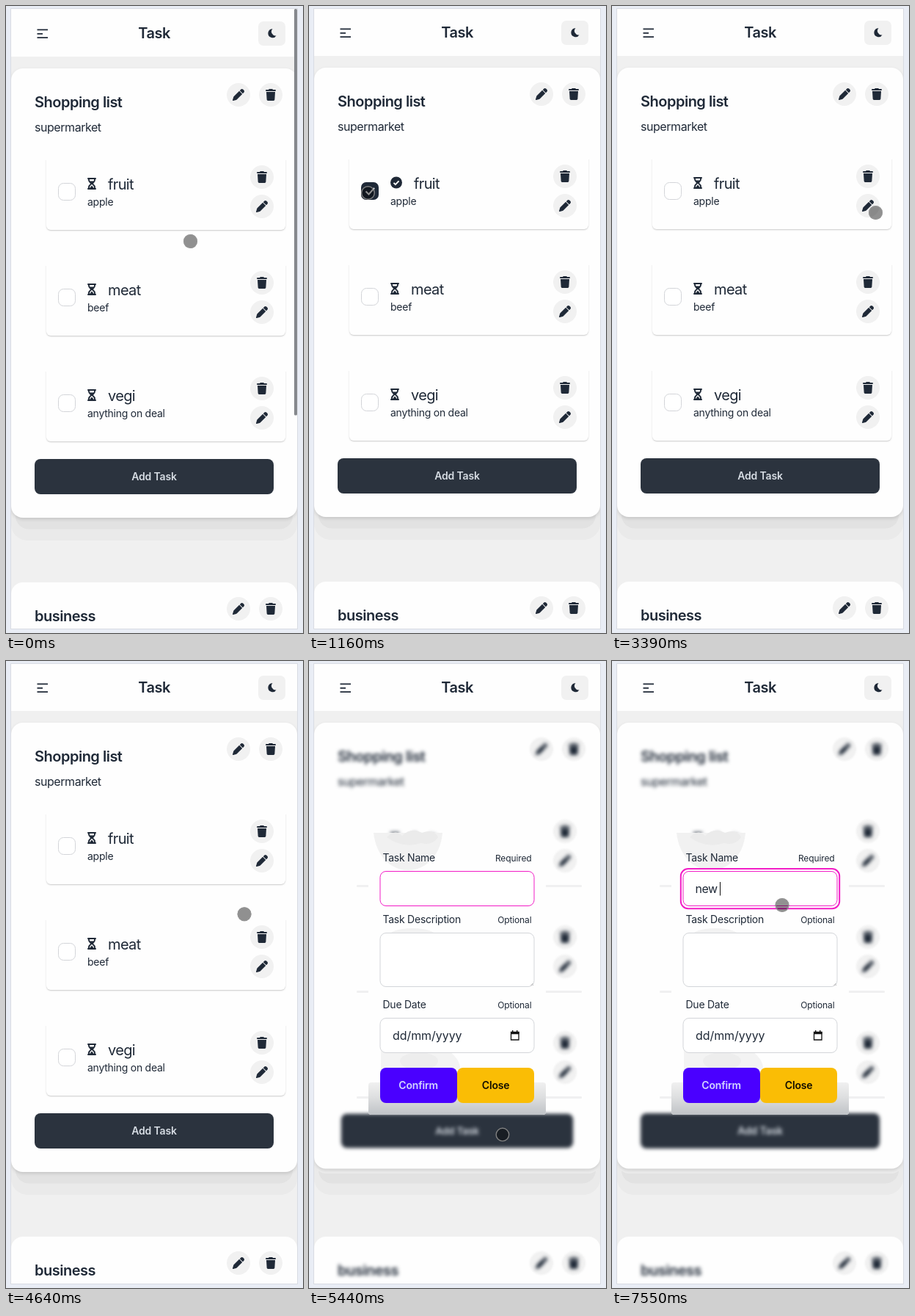
Recreate the animation shown at these times as an HTML page. Size 405 px wide and 854 px high, loop 8 s.

```html
<!DOCTYPE html>
<html lang="en">
<head>
<meta charset="utf-8">
<title>Task</title>
<style>
html, body { margin: 0; width: 100%; height: 100%; overflow: hidden; background: #e9edf5; }
svg { display: block; width: 405px; height: 854px; }
text { font-family: Inter, "Open Sans", sans-serif; font-optical-sizing: none; fill: #1f2937; white-space: pre; }
.h { font-size: 20px; font-weight: 600; letter-spacing: -.025em; }
.t { font-size: 20px; letter-spacing: -.032em; }
.m { font-size: 16px; letter-spacing: -.028em; }
.d { font-size: 16px; letter-spacing: -.004em; }
.s { font-size: 14px; letter-spacing: -.018em; }
.xs { font-size: 12px; letter-spacing: -.01em; }
.b { font-size: 14px; font-weight: 600; letter-spacing: -.012em; }
.end { text-anchor: end; }
.mid { text-anchor: middle; }
.ink { fill: #1f2937; }
.field { fill: #fff; stroke: #d3d5d9; }
.card { filter: drop-shadow(0 2px 2px rgba(0,0,0,.13)); }
.edge { fill: #fefefe; filter: drop-shadow(0 1px 1px rgba(0,0,0,.13)) drop-shadow(0 1px .6px rgba(0,0,0,.08)); }
.line { display: none; }
.open .line { display: inline; }
.open .edge, .open .box { display: none; }
.open .soft { filter: blur(2.5px); }
.open .disc { filter: blur(.8px); }
</style>
</head>
<body>
<svg id="stage" viewBox="0 0 405 854"></svg>
<script>
const stage = document.getElementById('stage');

const text = (x, y, cls, str, attrs = '') => `<text x="${x}" y="${y}" class="${cls}" ${attrs}>${str}</text>`;
const rect = (x, y, w, h, r, attrs) => `<rect x="${x}" y="${y}" width="${w}" height="${h}" rx="${r}" ${attrs}/>`;
const use = (id, x, y) => `<use href="#${id}" x="${x}" y="${y}"/>`;

const roundButton = (icon, x, y) =>
  `<circle class="disc" cx="${x}" cy="${y}" r="16" fill="#f1f1f1"/><g class="soft">${use(icon, x, y)}</g>`;

const cardHead = (title, y) =>
  text(39, y + 53, 'h soft', title) + roundButton('pen', 317, y + 36) + roundButton('trash', 361, y + 36);

const item = (title, note, i) => `<g transform="translate(0 ${i * 144})">
  <g clip-path="url(#itemClip)">${rect(55, 196, 326, 108, 6, 'class="edge"')}</g>
  ${rect(65, 305, 307, 3, 1, 'class="line" fill="#f0f0f1"')}
  ${rect(71.5, 240.5, 23, 23, 7, 'class="box" fill="#fff" stroke="#d3d5d9"')}
  <g class="soft">
    <g id="wait${i}">${use('glass', 111, 233)}</g>
    ${text(139, 249, 't', title, `id="title${i}"`)}
    ${text(111, 271, 's', note)}
  </g>
  ${roundButton('trash', 349, 232)}${roundButton('pen', 349, 272)}
</g>`;

const label = (y, name, hint) => text(100.5, y + 5, 's', name) + text(303.5, y + 4.5, 'xs end', hint);

stage.innerHTML = `
<defs>
  <clipPath id="screen"><rect x="7" y="4" width="390" height="844"/></clipPath>
  <clipPath id="itemClip"><rect x="48" y="209" width="340" height="104"/></clipPath>
  <linearGradient id="shade" x2="0" y2="1">
    <stop stop-color="#f0f0f0"/><stop offset=".45" stop-color="#dedfe0"/><stop offset="1" stop-color="#bfc2c6"/>
  </linearGradient>
  <g id="pen"><path class="ink" transform="translate(-8 -8) scale(.03125)"
    d="M363 19L314 68 444 198l49-49c25-25 25-65 0-90L453 19c-25-25-65-25-90 0zM292 90L59 323c-11 11-18 24-22 38L1 481c-6 20 10 36 30 30l120-35c14-4 27-12 38-23L422 220z"/></g>
  <g id="trash"><path class="ink" transform="translate(-7 -8) scale(.03125)"
    d="M135 18L128 32H32a32 32 0 0 0 0 64H416a32 32 0 0 0 0-64H320l-7-14C307 7 296 0 284 0H164c-12 0-23 7-29 18zM416 128H32L53 467c2 25 23 45 48 45H347c25 0 46-20 48-45z"/></g>
  <g id="glass" class="ink">
    <rect width="12" height="2" rx="1"/><rect y="14" width="12" height="2" rx="1"/>
    <path fill="none" stroke="#1f2937" stroke-width="1.9" d="M2 1V3C2 6 5 7 5.4 8 5 9 2 10 2 13V15M10 1V3C10 6 7 7 6.6 8 7 9 10 10 10 13V15"/>
    <path d="M3 4.6H9L6 8.4zM3.2 14L6 10.6 8.8 14z"/>
  </g>
</defs>
<rect width="405" height="854" fill="#e9edf5"/>
<rect x="6.5" y="3.5" width="391" height="845" fill="#f0f0f0" stroke="#d9dce3"/>
<g clip-path="url(#screen)">
  <g id="page">
    ${rect(7, 0, 390, 68, 0, 'fill="#fefefe"')}
    <path d="M42.5 31.3H57M42.5 36.8H50M42.5 42.2H57" stroke="#1f2937" stroke-width="1.7"/>
    ${text(202, 43.2, 'h mid', 'Task')}
    ${rect(344, 20, 37, 33, 7, 'fill="#f1f1f1"')}
    <path class="ink" d="M363.5 30.2A6 6 0 1 0 368.6 39.2A5.4 5.4 0 0 1 363.5 30.2z"/>

    ${rect(7, 110, 390, 617, 22, 'fill="#eaeaea"')}
    ${rect(13, 100, 378, 611.5, 18, 'fill="#e2e2e2"')}
    ${rect(7, 640, 390, 58, 16, 'id="lip" fill="#ececec"')}
    ${rect(7, 84, 390, 612, 16, 'id="card" class="card" fill="#fefefe"')}
    ${cardHead('Shopping list', 84)}
    ${text(39, 170, 'm soft', 'supermarket')}
    ${item('fruit', 'apple', 0)}${item('meat', 'beef', 1)}${item('vegi', 'anything on deal', 2)}
    <g id="done">
      ${rect(71, 240, 24, 24, 7, 'class="ink"')}
      <path d="M77.5 252.5l4 4 7.5-8.5" fill="none" stroke="#fff" stroke-width="2"/>
    </g>
    <g id="tick">
      <circle class="ink" cx="119" cy="240.5" r="8"/>
      <path d="M115.5 240.8l2.4 2.4 4.6-4.8" fill="none" stroke="#fff" stroke-width="1.9"/>
    </g>
    <g id="add"><g class="soft">
      ${rect(39, 616, 326, 48, 8, 'fill="#2b333e"')}
      ${text(202, 645, 'b mid', 'Add Task', 'style="fill:#d7dde4"')}
    </g></g>

    ${rect(7, 784, 390, 120, 16, 'fill="#fefefe"')}
    ${cardHead('business', 784)}
  </g>

  <g id="modal">
    ${rect(81, 234, 242, 384, 4, 'fill="#fefefe"')}
    <path d="M88 234H182C180 263 160 285 135 285S91 263 88 234z" fill="#f1f1f1"/>
    <path d="M106 240Q117 228 127 238 139 226 154 234 170 228 176 240 168 252 153 248 128 256 106 240z" fill="#ebebeb"/>
    <ellipse cx="141" cy="374" rx="32" ry="10" fill="#f2f2f2"/>
    <path d="M98 530H190Q207 544 206 556H98z" fill="#f3f3f3"/>
    <ellipse cx="150" cy="545" rx="26" ry="12" fill="#ededed"/>
    ${rect(81, 574, 242, 44, 4, 'fill="url(#shade)"')}
    ${label(268, 'Task Name', 'Required')}
    ${label(352, 'Task Description', 'Optional')}
    ${label(468, 'Due Date', 'Optional')}
    ${rect(93.8, 283, 216.4, 54.2, 10, 'id="ring" fill="#fff" stroke="#f21cc6" stroke-width="2"')}
    ${rect(97, 286.5, 210, 47, 8, 'fill="#fff" stroke="#f21cc6"')}
    ${rect(97, 370.5, 210, 73, 8, 'class="field"')}
    <path d="M302.5 442l3-3M305 442l.8-.8" stroke="#8a8a8a" stroke-width=".7"/>
    ${rect(97, 486.5, 210, 47, 8, 'class="field"')}
    ${text(114, 516, 'd', 'dd/mm/yyyy')}
    <path d="M275.5 505.5h10.5v10.5h-10.5z" fill="none" stroke="#111" stroke-width="1.3"/>
    <path d="M275 505h11.5v3.2H275zM277 503h1.4v3H277zM283 503h1.4v3H283z" fill="#111"/>
    ${rect(97, 554, 105, 48, 8, 'fill="#4a00ff"')}
    ${rect(202, 554, 105, 48, 8, 'fill="#fabd05"')}
    ${text(149.2, 583, 'b mid', 'Confirm', 'style="fill:#d3d5ff"')}
    ${text(254.6, 583, 'b mid', 'Close', 'style="fill:#140f00"')}
    ${text(113.5, 316, 'm', '', 'id="typed"')}
    <rect id="caret" y="301" width="1" height="18.5" fill="#111"/>
  </g>
  <rect id="bar" x="393" y="4" width="4" height="553.5" rx="1.5" fill="#85888d"/>
</g>
<g id="cursor">
  <circle r="9.5" fill="#000" fill-opacity=".43"/>
  <circle r="8.8" fill="none" stroke="#949494" stroke-opacity=".85" stroke-width="1.4"/>
</g>`;

const el = {};
stage.querySelectorAll('[id]').forEach(n => el[n.id] = n);

const out = p => k => 1 - (1 - k) ** p;
const inOut = k => k < .5 ? 2 * k * k : 1 - 2 * (1 - k) ** 2;
const linear = k => k;

// Each move starts where the one before ended; "via" bends the path.
const home = [251.5, 320.5];
const moves = [
  { start: 90, end: 710, steps: 8, ease: out(2), via: [166, 287.5], to: [80.5, 254.5] },
  { start: 2680, end: 3390, steps: 9, ease: inOut, via: [220, 239.4], to: [359.5, 281.5] },
  { start: 3840, end: 3930, steps: 2, ease: linear, via: [354.5, 278], to: [349.5, 274.5] },
  { start: 4640, end: 5170, steps: 7, ease: out(1.3), via: [277, 469], to: [261, 653.5] },
  { start: 5440, end: 6040, steps: 8, ease: inOut, via: [310, 520], to: [232, 332.5] }
];

// The picture advances in discrete steps, the first one at "start".
const stepped = (t, start, end, steps) =>
  t < start ? 0 : Math.min(1, (Math.floor((t - start) / (end - start) * (steps - 1) + .06) + 1) / steps);

function cursorAt(t) {
  let from = home;
  for (const { start, end, steps, ease, via, to } of moves) {
    if (t < start) break;
    const e = ease(stepped(t, start, end, steps));
    from = from.map((a, i) => (1 - e) ** 2 * a + 2 * e * (1 - e) * via[i] + e * e * to[i]);
  }
  return from;
}

const show = (node, on) => node.style.display = on ? '' : 'none';

function draw(t) {
  const open = t >= 5440;
  const checked = t >= 980 && t < 2230;

  el.page.setAttribute('transform', `translate(0 ${t < 90 ? 1 : 0})`);
  el.bar.style.opacity = 1 - stepped(t, 180, 440, 4);
  el.cursor.setAttribute('transform', `translate(${cursorAt(t)})`);

  show(el.done, checked);
  el.done.style.opacity = stepped(t, 980, 1160, 3);
  show(el.tick, checked);
  show(el.wait0, !checked);
  el.title0.setAttribute('x', checked ? 143 : 139);

  el.page.classList.toggle('open', open);
  show(el.modal, open);
  show(el.lip, open);
  el.card.setAttribute('height', open ? 607.5 : 612);
  const press = open && t < 5530 ? .97 : 1;
  el.add.setAttribute('transform', `translate(202 640) scale(${press}) translate(-202 -640)`);

  show(el.ring, t >= 6300);
  el.typed.textContent = t < 7110 ? '' : t < 7200 ? 'ne' : 'new';
  const caretX = t < 7110 ? 113.5 : t < 7200 ? 132 : t < 7550 ? 143 : 147;
  el.caret.setAttribute('x', caretX);
  show(el.caret, t >= 6300 && (t < 6840 || t >= 7110));
}

const begin = performance.now();
function tick() {
  draw((performance.now() - begin) % 8000);
  requestAnimationFrame(tick);
}
tick();
</script>
</body>
</html>
```
